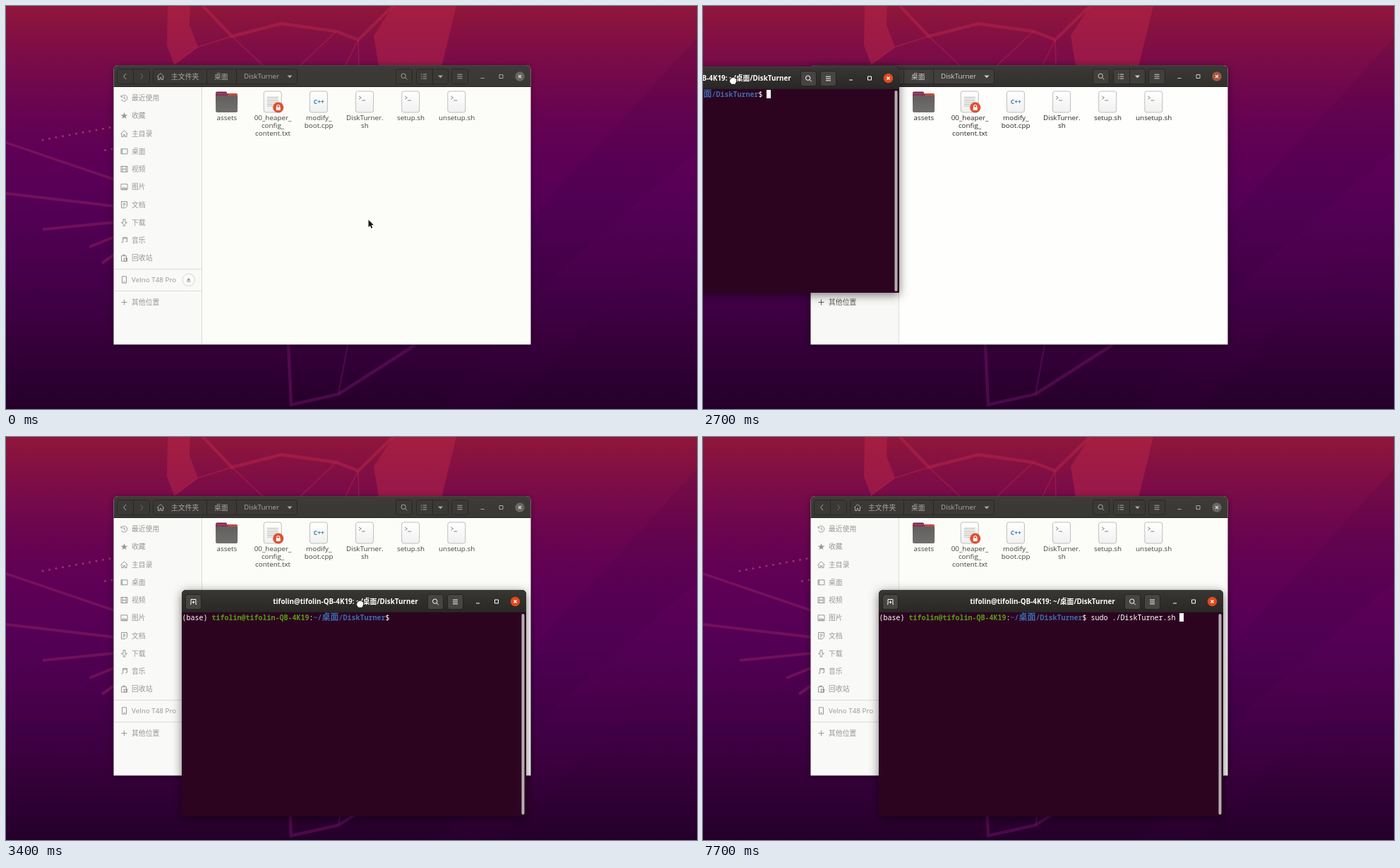
These frames come from a looping animation (979x572 px, 8000 ms). An HTML page with a canvas:

```html
<!DOCTYPE html>
<html lang="zh-CN">
<head>
<meta charset="utf-8">
<style>
html, body { margin: 0; width: 100%; height: 100%; overflow: hidden; background: #2a002c; }
canvas { display: block; }
</style>
</head>
<body>
<canvas id="stage" width="979" height="572"></canvas>
<script>
const ctx = document.getElementById('stage').getContext('2d');
const LOOP = 8000, STEP = 100;
const CJK = '"Noto Sans CJK SC", "Noto Sans CJK JP", sans-serif';
const UI = '9.85px "Open Sans", ' + CJK;
const BOLD = 'bold ' + UI;
const MONO = '10px "Noto Sans Mono", "DejaVu Sans Mono", monospace';
const USER = 'tifolin', HOST = 'tifolin-QB-4K19', APP = 'DiskTurner', PHONE = 'Velno T48 Pro';
const COMMAND = 'sudo ./' + APP + '.sh ';

const GLYPH = {
  recent: 'M-4-2A4.4 4.4 0 1 1-4 2M0-2.5V.5L2 1.5M-4.5-4V-1.5H-2',
  star: 'M0-4.8L1.3-1.5 4.8-1.4 2 .8 3 4.2 0 2.2-3 4.2-2 .8-4.8-1.4-1.3-1.5Z',
  home: 'M-5 .5L0-4.5 5 .5M-3.5-.5V4.5H-1V1.5H1V4.5H3.5V-.5',
  desk: 'M-4.5-3.5H4.5V3.5H-4.5ZM-3-3.5V3.5',
  video: 'M-4.5-4H4.5V4H-4.5ZM-2.5-4V4M2.5-4V4M-2.5 0H2.5',
  image: 'M-4.5-4H4.5V4H-4.5ZM-3.5 2.8L-1 0 1 2 2 1 3.5 2.8Z',
  doc: 'M-4-4.5H4V2L1.5 4.5H-4ZM-2-2H2M-2 0H2M-2 2H0',
  down: 'M-1.5-4.5H1.5V0H4L0 3.5-4 0H-1.5ZM-2 4.7H2',
  music: 'M-1.8 3V-4H4V2M-1.8-2.5H4M-4 3.2H-2M1.8 2.2H3.8',
  trash: 'M-4-3H3V4.5H-4ZM-2-3V-4.5H1V-3M-1 .5H5M0 .5V4.5H4V.5',
  phone: 'M-3-4.7H3V4.7H-3ZM-1 3H1',
  plus: 'M-4 0H4M0-4V4',
  left: 'M1.5-4L-1.8 0 1.5 4',
  right: 'M-1.5-4L1.8 0-1.5 4',
  search: 'M2.4-.8A3.2 3.2 0 1 1-4-.8A3.2 3.2 0 1 1 2.4-.8M1.5 1.5L4.3 4.3',
  list: 'M-4-3H-2.6M-4 0H-2.6M-4 3H-2.6M-1.3-3H4M-1.3 0H4M-1.3 3H4',
  bars: 'M-3.5-2.8H3.5M-3.5 0H3.5M-3.5 2.8H3.5',
  tab: 'M-4.5 3.5H-3.5V-3.5H3.5V3.5H4.5M0-1.5V2.5M-2 .5H2',
  min: 'M-2.5 2.5H2.5',
  max: 'M-2.5-2.5H2.5V2.5H-2.5Z',
  close: 'M-2-2L2 2M2-2L-2 2'
};
const PLACES = [['recent', '最近使用'], ['star', '收藏'], ['home', '主目录'], ['desk', '桌面'],
  ['video', '视频'], ['image', '图片'], ['doc', '文档'], ['down', '下载'], ['music', '音乐'], ['trash', '回收站']];
const FILES = [['dir', 'assets'], ['txt', '00_heaper_', 'config_', 'content.txt'], ['cpp', 'modify_', 'boot.cpp'],
  ['sh', APP + '.', 'sh'], ['sh', 'setup.sh'], ['sh', 'unsetup.sh']];
const MENU = [['新建文件夹(F)', 'Shift+Ctrl+N'], ['粘贴(P)'], ['全选(A)', 'Ctrl+A'], ['属性(R)'],
  ['在终端打开(E)'], ['还原丢失的文件...']];

function mix(a, b, k) {
  const at = i => {
    const p = parseInt(a.substr(i, 2), 16), q = parseInt(b.substr(i, 2), 16);
    return Math.round(p + (q - p) * k);
  };
  return `rgb(${at(1)},${at(3)},${at(5)})`;
}

function fade(y0, y1, ...stops) {
  const g = ctx.createLinearGradient(0, y0, 0, y1);
  stops.forEach((c, i) => g.addColorStop(i / (stops.length - 1), c));
  return g;
}

function rect(x, y, w, h, fill) {
  ctx.fillStyle = fill;
  ctx.fillRect(x, y, w, h);
}

function box(x, y, w, h, r, fill, stroke) {
  ctx.beginPath();
  ctx.roundRect(x, y, w, h, r);
  if (fill) { ctx.fillStyle = fill; ctx.fill(); }
  if (stroke) { ctx.strokeStyle = stroke; ctx.lineWidth = 1; ctx.stroke(); }
}

function disc(x, y, r, fill) {
  ctx.beginPath();
  ctx.arc(x, y, r, 0, 7);
  ctx.fillStyle = fill;
  ctx.fill();
}

function poly(pts, fill, stroke, width) {
  ctx.beginPath();
  for (let i = 0; i < pts.length; i += 2) ctx.lineTo(pts[i], pts[i + 1]);
  if (fill) { ctx.fillStyle = fill; ctx.fill(); }
  if (stroke) { ctx.strokeStyle = stroke; ctx.lineWidth = width; ctx.stroke(); }
}

function text(s, x, y, color, align = 'left', font = UI) {
  ctx.font = font;
  ctx.textAlign = align;
  ctx.fillStyle = color;
  ctx.fillText(s, x, y + 3.5);
}

function icon(name, x, y, color, solid, width = 1) {
  const path = new Path2D(GLYPH[name]);
  ctx.save();
  ctx.translate(x, y);
  ctx.strokeStyle = ctx.fillStyle = color;
  ctx.lineWidth = width;
  solid ? ctx.fill(path) : ctx.stroke(path);
  ctx.restore();
}

function arrowDown(x, y, color) {
  poly([x - 3.5, y - 1.5, x + 3.5, y - 1.5, x, y + 2.2], color);
}

function wallpaper() {
  rect(0, 0, 979, 572, fade(0, 572, '#90163a', '#7b0c48', '#690450', '#5d0056', '#540055', '#4a004d', '#3e0042', '#320036', '#25002a'));
  poly([979, 45, 870, 165, 745, 300, 745, 410, 979, 205], 'rgba(40,0,60,.10)');
  poly([979, 205, 745, 410, 620, 572, 700, 572, 979, 300], 'rgba(90,0,90,.06)');
  const red = 'rgba(190,40,75,.45)', pink = 'rgba(155,40,100,.42)', plum = 'rgba(120,20,110,.45)';
  poly([229, 0, 261, 0, 260, 27, 272, 58, 238, 83, 228, 56], red);
  poly([548, 0, 638, 0, 617, 86, 528, 86, 521, 42], red);
  poly([279, 0, 320, 43, 390, 25, 468, 36, 499, 48, 548, 0], null, red, 4.5);
  poly([238, 83, 272, 58, 320, 43, 366, 86], null, red, 1.5);
  poly([415, 86, 468, 36], null, red, 1.5);
  poly([499, 48, 480, 86], null, red, 1.5);
  poly([499, 48, 500, 86], null, red, 1.5);
  poly([0, 194, 153, 246], null, pink, 3.5);
  poly([0, 266, 153, 284], null, pink, 4);
  poly([52, 317, 153, 307], null, pink, 4);
  poly([118, 342, 153, 328], null, pink, 4);
  poly([136, 365, 153, 353], null, pink, 4);
  for (let i = 0; i < 11; i++) disc(52 + i * 9.5, 190 - i * 1.75, 1.5, '#983472');
  disc(140.5, 204.5, 1.5, '#983472');
  disc(150, 203, 1.5, '#983472');
  poly([400, 480, 404, 566, 471, 551, 580, 481], null, plum, 4.5);
  poly([484, 481, 471, 551], null, plum, 2);
}

function frame(x, y, w, h, head, body, focus) {
  ctx.save();
  ctx.shadowColor = `rgba(0,0,0,${0.4 + 0.12 * focus})`;
  ctx.shadowBlur = 10 + 4 * focus;
  ctx.shadowOffsetY = 2 + focus;
  box(x, y, w, h, [6, 6, 0, 0], body);
  ctx.restore();
  box(x, y, w, head, [6, 6, 0, 0], fade(y, y + head, mix('#3d3b38', '#383733', focus), mix('#3a3835', '#282725', focus)));
  rect(x + 5, y, w - 10, 1, 'rgba(255,255,255,.06)');
  rect(x, y + head - 1, w, 1, '#242321');
}

function button(x, y, w, focus) {
  box(x + .5, y + .5, w - 1, 21, 3, mix('#3b3936', '#464542', focus), mix('#2a2826', '#242321', focus));
}

function controls(x, y, ink, focus) {
  icon('min', x, y, ink);
  icon('max', x + 26.5, y, ink);
  disc(x + 53, y, 6.7, mix('#686660', '#e2491d', focus));
  icon('close', x + 53, y, mix('#d8d6d2', '#ffffff', focus), false, 1.3);
}

function fileIcon(kind, x) {
  if (kind === 'dir') {
    box(x - 15.5, 121.5, 16, 12, 2, '#78305d');
    box(x - 15.5, 124, 31, 14, 2, '#c64b3e');
    rect(x - 15.5, 125, 17, 5, '#81305b');
    box(x - 15.5, 127, 31, 24, 2, fade(127, 151, '#62605e', '#716f6d'));
    return;
  }
  box(x - 12.5, 121, 25, 30, 3, fade(121, 151, '#ffffff', '#f0f0f0'), '#bebebb');
  if (kind === 'txt') {
    for (let i = 0; i < 6; i++) rect(x - 8, 129 + i * 2.5, i === 5 ? 9 : 16, 1, '#bbbbb8');
    disc(x + 8, 144, 7.6, '#dd5233');
    box(x + 5, 143.5, 6, 4.5, 1, '#fff');
    ctx.beginPath();
    ctx.arc(x + 8, 142.5, 2, Math.PI, 0);
    ctx.lineTo(x + 10, 144);
    ctx.moveTo(x + 6, 142.5);
    ctx.lineTo(x + 6, 144);
    ctx.strokeStyle = '#fff';
    ctx.lineWidth = 1.1;
    ctx.stroke();
  } else if (kind === 'cpp') {
    text('C++', x + .5, 135, '#3c80ac', 'center', 'bold 8.5px "Open Sans", sans-serif');
  } else {
    poly([x - 8, 128, x - 4.8, 130.2, x - 8, 132.4], null, '#858583', 1);
    rect(x - 4, 133.5, 5, 1, '#858583');
  }
}

function fileWindow(focus) {
  const ink = mix('#a9a7a1', '#f4f4f2', focus), dim = mix('#6d6b67', '#858380', focus);
  const side = mix('#979793', '#202020', focus), label = mix('#42423f', '#0c0c0c', focus);
  const rule = '#dddddb';
  frame(152.5, 84, 591, 396.5, 31, mix('#fcfdf9', '#ffffff', focus), focus);

  button(157, 89, 47, focus);
  rect(180, 89, 1, 21, '#292725');
  icon('left', 168.5, 100, ink);
  icon('right', 192, 100, dim);
  button(208, 89, 205, focus);
  rect(284, 89, 1, 21, '#292725');
  rect(326, 89, 1, 21, '#292725');
  icon('home', 219, 100, ink);
  text('主文件夹', 234, 100, ink);
  text('桌面', 295, 100, ink);
  text(APP, 337, 99.5, ink);
  arrowDown(402, 100, ink);
  button(552, 89, 24, focus);
  icon('search', 564, 100, ink);
  button(581, 89, 46, focus);
  rect(604, 89, 1, 21, '#292725');
  icon('list', 592, 100, ink);
  arrowDown(615.5, 100, ink);
  button(631, 89, 24, focus);
  icon('bars', 643, 100, ink);
  controls(675, 100, ink, focus);

  rect(153, 115, 124, 365, mix('#f9f9f7', '#f6f6f5', focus));
  rect(277, 115, 1, 365, rule);
  PLACES.forEach(([name, title], i) => {
    const y = 130.7 + i * 25.22;
    icon(name, 167.5, y, side, name === 'star');
    text(title, 178, y, side);
  });
  rect(153, 373, 124, 1, rule);
  rect(153, 404, 124, 1, rule);
  icon('phone', 167.5, 388.5, side);
  text(PHONE, 178, 388.5, side);
  box(250, 380, 17.5, 17.5, 9, mix('#fafaf8', '#f8f8f7', focus), '#d6d6d3');
  poly([256, 389.5, 261.5, 389.5, 258.7, 386], side);
  rect(256, 390.5, 5.5, 1, side);
  icon('plus', 167.5, 420.5, side);
  text('其他位置', 178, 420.5, side);

  FILES.forEach(([kind, ...lines], i) => {
    const x = 312.6 + i * 65.15;
    fileIcon(kind, x);
    lines.forEach((s, n) => text(s, x + .3, 158 + n * 11.4, label, 'center'));
  });
}

function contextMenu(mouse) {
  ctx.save();
  ctx.shadowColor = 'rgba(0,0,0,.25)';
  ctx.shadowBlur = 4;
  ctx.shadowOffsetY = 1;
  box(514.5, 305.5, 176.5, 131, 3, '#fafaf9');
  ctx.restore();
  const hover = Math.floor((mouse[1] - 308) / 21.2);
  MENU.forEach(([title, keys], i) => {
    const y = 318.7 + i * 21.2;
    if (i === hover && i !== 1) rect(515, y - 11, 176, 21.2, '#dadada');
    if (i < 4) rect(515, Math.round(y + 10), 176, 1, '#e3e3e1');
    text(title, 535, y, i === 1 ? '#9c9c99' : '#333331');
    if (keys) text(keys, 685, y, '#8d8d8a', 'right');
  });
  box(514.5, 305.5, 176.5, 131, 3, null, '#a3a39f');
}

function terminal(x, y, o) {
  const ink = mix('#a9a7a1', '#ffffff', o.focus);
  frame(x, y - 1, 488, 321, 32, '#2d0420', o.focus);
  button(x + 5, y + 5, 23, o.focus);
  icon('tab', x + 16.5, y + 16, ink);
  button(x + 348, y + 5, 23, o.focus);
  icon('search', x + 359.5, y + 16, ink);
  button(x + 376, y + 5, 23, o.focus);
  icon('bars', x + 387.5, y + 16, ink);
  controls(x + 419.5, y + 15.5, ink, o.focus);
  if (!o.ready) {
    text('终端', x + 244, y + 15.5, ink, 'center', BOLD);
    return;
  }
  text(`${USER}@${HOST}: ~/桌面/${APP}`, x + 232, y + 15.5, ink, 'center', BOLD);
  box(x + 481.5, y + 33, 4, 285, 2, '#b5adb1');
  const cell = (s, col, color, font = MONO) => text(s, x + .5 + col * 6, y + 38.3, color, 'left', font);
  const bold = 'bold ' + MONO, blue = '#3b6cae';
  cell('(base)', 0, '#ffffff');
  cell(`${USER}@${HOST}`, 7, '#559e10', bold);
  cell(':', 30, '#ffffff');
  cell('~/', 31, blue, bold);
  cell('桌面', 33, blue, 'bold 12px ' + CJK);
  cell('/' + APP, 37, blue, bold);
  cell('$', 48, '#ffffff');
  cell(o.typed, 50, '#ffffff');
  const cx = x + 300 + o.typed.length * 6;
  if (!o.focus) box(cx + .5, y + 32.5, 5, 11, 0, null, '#ffffff');
  else if (o.caret) rect(cx, y + 32, 6, 12, '#ffffff');
}

function pointer(kind, [x, y]) {
  ctx.save();
  ctx.translate(x, y);
  ctx.lineJoin = 'round';
  if (kind === 'arrow') {
    const p = [0, 0, 0, 10.5, 2.4, 8.3, 4, 12, 5.8, 11.2, 4.2, 7.6, 7.3, 7.3, 0, 0];
    poly(p, null, '#ffffff', 1.6);
    poly(p, '#1a1a1a');
  } else if (kind === 'grab') {
    const hand = new Path2D('M-4-1Q-4-3-2.2-3Q-1.5-5 0-4Q1.5-5 2.2-3.5Q4.5-3.5 4.4-1.5V1.5Q4 3 3 4.8H-2.2L-4.6 1.5Q-5 0-4-1Z');
    ctx.strokeStyle = '#1a1a1a';
    ctx.lineWidth = 1.4;
    ctx.stroke(hand);
    ctx.fillStyle = '#ffffff';
    ctx.fill(hand);
  } else {
    const beam = new Path2D('M-2.5-6Q0-6 0-4.5Q0-6 2.5-6M0-5V5M-2.5 6Q0 6 0 4.5Q0 6 2.5 6');
    ctx.strokeStyle = '#ffffff';
    ctx.lineWidth = 2.2;
    ctx.stroke(beam);
    ctx.strokeStyle = '#1a1a1a';
    ctx.lineWidth = 1;
    ctx.stroke(beam);
  }
  ctx.restore();
}

const smooth = k => { k = Math.min(1, Math.max(0, k)); return k * k * (3 - 2 * k); };
const between = (a, b, k) => a.map((v, i) => v + (b[i] - v) * k);

// Window corner during the drag, on a slightly bowed path; the pointer trails it by one step.
const DRAG = [0, .096, .438, .7, .86, .95, 1];
function corner(t) {
  const k = DRAG[Math.min(6, Math.max(0, (t - 2700) / STEP))];
  return [Math.round(-210 + 459 * k), Math.round(87 + 131 * k ** 1.14)];
}

function mouseAt(t) {
  if (t < 1800) return between([513.5, 303.5], [566.5, 407.5], smooth((t - 600) / 600));
  if (t <= 2000) return between([566.5, 407.5], [520, 391], ((t - 1800) / 200) ** 1.5);
  if (t < 2700) return between([520, 391], [42, 105], smooth((t - 1900) / 700));
  if (t < 3600) { const [x, y] = corner(t - STEP); return [x + 252.5, y + 19]; }
  return t < 3900 ? [592, 289] : [604, 279];
}

const KEYS = [[5100, 1], [5500, 2], [5600, 4], [5800, 5], [6100, 6], [6200, 7], [7300, 8], [7700, COMMAND.length]];
function typedAt(t) {
  let n = 0;
  for (const [at, count] of KEYS) if (t >= at) n = count;
  return COMMAND.slice(0, n);
}

function caretAt(t) {
  if (t < 5000) return t < 3300 || (t >= 3900 && t < 4500);
  return !(t >= 6900 && t < 7200);
}

function draw(t) {
  const mouse = mouseAt(t);
  const fileFocus = t < 600 || t > 2700 ? 0 : t === 600 || t === 2700 ? .5 : 1;
  const state = {
    focus: t < 2700 ? 0 : 1,
    ready: t >= 2300,
    typed: typedAt(t),
    caret: caretAt(t)
  };
  wallpaper();
  if (t >= 1900 && t < 2700) {
    const s = t === 1900 ? .94 : t === 2000 ? .992 : 1;
    ctx.save();
    ctx.globalAlpha = t === 1900 ? .5 : t === 2000 ? .93 : 1;
    ctx.translate(34, 247);
    ctx.scale(s, s);
    terminal(-244, -160, state);
    ctx.restore();
  }
  fileWindow(fileFocus);
  if (t >= 600 && t < 1800) {
    ctx.globalAlpha = t === 600 ? .6 : 1;
    contextMenu(mouse);
    ctx.globalAlpha = 1;
  }
  if (t >= 2700) terminal(...corner(t), state);
  if (t < 2700) pointer('arrow', mouse);
  else if (t < 3600) pointer('grab', mouse);
  else if (t < 5000) pointer('beam', mouse);
}

const start = performance.now();
function tick() {
  const ms = (performance.now() - start) % LOOP;
  draw(Math.floor(ms / STEP) * STEP);
  requestAnimationFrame(tick);
}
tick();
</script>
</body>
</html>
```
